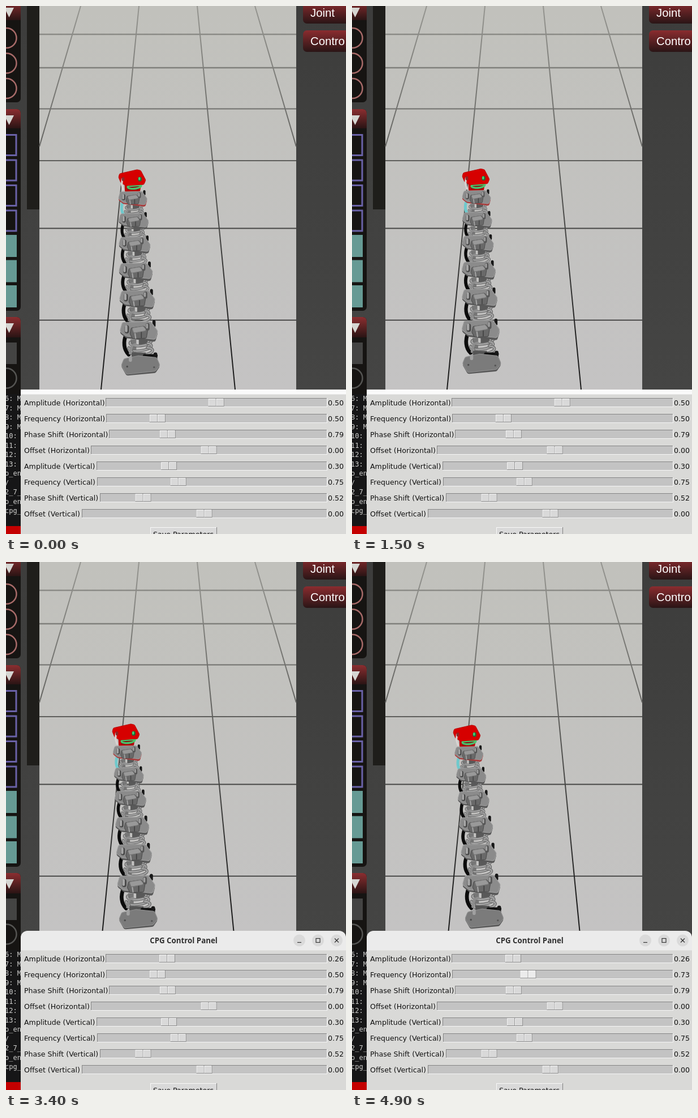
These frames come from a looping animation (601x932 px, 5 s). An HTML page with a canvas:

```html
<!DOCTYPE html>
<html lang="en">
<head>
<meta charset="utf-8">
<title>CPG control</title>
<style>
html, body { margin: 0; width: 100%; height: 100%; overflow: hidden; background: #424241; }
canvas { display: block; }
</style>
</head>
<body>
<canvas id="stage" width="601" height="932"></canvas>
<script>
const c = document.getElementById('stage').getContext('2d');
const LOOP = 5000, STEP = 100;
const SANS = '12.6px "DejaVu Sans", sans-serif';
const lerp = (a, b, u) => a + (b - a) * u;
const ramp = (t, t0, t1, a, b) => lerp(a, b, Math.min(1, Math.max(0, (t - t0) / (t1 - t0))));

function rect(x, y, w, h, fill) {
  c.fillStyle = fill;
  c.fillRect(x, y, w, h);
}
function round(x, y, w, h, r, fill) {
  c.fillStyle = fill;
  c.beginPath();
  c.roundRect(x, y, w, h, r);
  c.fill();
}
function line(pts, color, width) {
  c.strokeStyle = color;
  c.lineWidth = width;
  c.beginPath();
  pts.forEach(p => c.lineTo(p[0], p[1]));
  c.stroke();
}
function ring(x, y, r, color, width) {
  c.strokeStyle = color;
  c.lineWidth = width;
  c.beginPath();
  c.arc(x, y, r, 0, 7);
  c.stroke();
}
function text(s, x, y, font, color, align = 'left') {
  c.font = font;
  c.fillStyle = color;
  c.textAlign = align;
  c.fillText(s, x, y);
}
function fade(y0, y1, a, b) {
  const g = c.createLinearGradient(0, y0, 0, y1);
  g.addColorStop(0, a);
  g.addColorStop(1, b);
  return g;
}
// Polygon with softened corners
function slab(pts, fill, edge, r = 4) {
  const n = pts.length, last = pts[n - 1];
  c.beginPath();
  c.moveTo((last[0] + pts[0][0]) / 2, (last[1] + pts[0][1]) / 2);
  pts.forEach((p, i) => {
    const q = pts[(i + 1) % n];
    c.arcTo(p[0], p[1], (p[0] + q[0]) / 2, (p[1] + q[1]) / 2, r);
  });
  c.closePath();
  c.fillStyle = fill;
  c.fill();
  if (edge) {
    c.strokeStyle = edge;
    c.lineWidth = 1;
    c.stroke();
  }
}

function header(x, y, h, w) {
  round(x, y, w, h, [7, 7, 0, 0], fade(y, y + h, '#8b2e30', '#2a1414'));
}
function arrow(y) {
  c.fillStyle = '#d6d6d2';
  c.beginPath();
  c.moveTo(-3, y);
  c.lineTo(14, y);
  c.lineTo(5.5, y + 17);
  c.fill();
}

function sidePanels() {
  rect(0, 0, 601, 932, fade(0, 677, '#3d3d3c', '#454544'));
  rect(37, 0, 22, 359, '#1f1e1b');

  round(-20, -20, 46, 190, 7, '#161412');
  header(-20, -10, 35, 46);
  arrow(3);
  for (const y of [56.5, 101, 145.5]) ring(1, y, 17.5, '#a86b69', 2.5);

  round(-20, 182, 46, 356, 7, '#161412');
  header(-20, 182, 34, 46);
  arrow(193);
  for (let i = 0; i < 7; i++) {
    const y = 226 + i * 44.5;
    if (i < 4) {
      c.strokeStyle = '#6a62a8';
      c.lineWidth = 3;
      c.strokeRect(-20, y + 1.5, 38, 36);
    } else rect(-20, y, 39, 39, '#669a94');
  }

  round(-20, 549, 46, 200, 7, '#161412');
  header(-20, 549, 36, 46);
  arrow(560);
  rect(-20, 594, 39, 38, '#444443');
  ring(1, 657, 17.5, '#555553', 2.5);

  for (const y of [-8, 43]) {
    const h = y < 0 ? 39 : 38;
    round(525, y, 90, h, 7, fade(y, y + h, '#8a2c2f', '#2a1516'));
  }
  const big = '20.3px "Liberation Sans", Arial, sans-serif';
  text('Joint', 538, 18.5, big, '#fff');
  text('Contro', 538, 69, big, '#fff');
}

function terminal() {
  rect(0, 685, 26, 247, '#161617');
  const rows = ['6: M', '7: M', '8: M', '9: M', '10:', '11:', '12:', '13:', 'o_en', '/', '2_7_', 'o_en', 'cpg_'];
  rows.forEach((s, i) =>
    text(s, -2, 697 + i * 16.5, '12px "DejaVu Sans Mono", monospace', '#d0d0ce'));
  rect(0, 918, 26, 14, '#c40000');
}

function floor() {
  rect(59, 0, 454, 677, fade(0, 677, '#c1c1bc', '#c4c3c3'));
  const ink = fade(0, 600, '#959590', '#1c1c1c');
  [50, 109, 181.5, 273, 392.5, 554.5].forEach(y =>
    line([[59, y], [513, y]], ink, 2.5 - y / 600));
  [[132, 59, 248], [235, 168, 677], [338, 405, 677], [440, 513, 248]].forEach(([a, b, y]) =>
    line([[a, 0], [b, y]], ink, 2));
}

// time, head x, bend, tail x, head y, tail y, sway, lift, half waves to the next pose
const POSES = [
  [0, 223, -2.2, 238, 304, 632, 6, 3, 3],
  [900, 218, 0, 232.5, 302, 631, 6, 3, 2],
  [1500, 219, -1, 229.5, 302.5, 629, 6, 6, 3],
  [2300, 216, -.7, 231.5, 303, 631, 4, 9, 4],
  [3400, 212, -1.5, 234, 301, 628, 3, 8, 4],
  [4400, 205, -3.5, 238, 303, 627, 2, 6, 2],
  [4900, 203, -1.5, 234, 303, 627, 0, 0, 1]
];
const ROWS = [303, 338, 377, 419, 466, 515, 571, 630];
const HALF = [24, 25.5, 26.5, 28, 30, 31.5, 33.5, 34];

function joints(t) {
  let i = POSES.length - 1;
  while (POSES[i][0] > t) i--;
  const a = POSES[i], b = POSES[i + 1] || a;
  const s = b === a ? 0 : (t - a[0]) / (b[0] - a[0]);
  const [, hx, bend, tx, hy, ty] = a.map((v, k) => lerp(v, b[k], s));
  const wave = Math.sin(Math.PI * a[8] * s);
  return ROWS.map((y, k) => {
    const u = k / 7;
    return {
      x: lerp(hx - a[6] * wave, tx + 1.5 * wave, u) + bend * 4 * u * (1 - u),
      y: y + lerp(hy - 303 - a[7] * Math.abs(wave), ty - 630 - Math.abs(wave), u),
      s: HALF[k] / 30
    };
  });
}

function peg(x, y, w, h, fill) {
  round(x - w / 2, y - h / 2, w, h, w / 2, fill);
}
function coil(x, y, rx, ry, from, to) {
  const arc = (color, width) => {
    c.strokeStyle = color;
    c.lineWidth = width;
    c.beginPath();
    c.ellipse(x, y, rx, ry, -.12, from, to);
    c.stroke();
  };
  arc('#646464', 4.6);
  arc('#a2a2a2', 2.6);
}
function cable(color) {
  c.strokeStyle = color;
  c.lineWidth = 6;
  c.beginPath();
  c.moveTo(-20, 6);
  c.bezierCurveTo(-25, 18, -24, 30, -16, 38);
  c.stroke();
}

function link(k) {
  cable(k === 1 ? '#6fc9cc' : '#0c0c0c');
  rect(-13, 14, 9, 24, '#777');
  rect(0, 12, 14, 12, '#595959');
  coil(3, 18, 17, 6, -.3, 3.4);
  coil(2, 26, 18, 6, -.8, 3.3);
  coil(5, 33, 17, 6, -1, 3.5);
  line([[-14, 36], [-11, 24], [-5, 22]], '#8d8d8d', 4);
  peg(24, -11, 5, 11, '#171717');
  slab([[-26, -10], [19, -11], [30, 4], [26, 18], [-20, 12], [-30, 4]], k === 1 ? '#a83c3c' : '#585858');
  slab([[-26, -13], [19, -14], [30, 1], [26, 14], [-20, 9], [-30, 1]], '#8b8b8b', '#a0a0a0');
  slab([[-12, -4], [8, -7], [14, 0], [12, 12], [-10, 13], [-14, 5]], '#696969', '#4c4c4c', 2);
  slab([[-11, -4], [7, -7], [13, 0], [-8, 4]], '#999', '#777', 2);
  line([[-6, 5], [-5, 12]], '#a5a5a5', 2);
  line([[4, 3], [4, 11]], '#404040', 1.5);
  peg(-19, -2, 7, 13, '#484848');
  peg(-20, -3, 4, 11, '#a6a6a6');
  peg(14, -6, 6, 12, '#565656');
  peg(13, -7, 3, 8, '#a0a0a0');
}

function head() {
  slab([[-17, 8], [21, 9], [17, 31], [-16, 31]], '#b90707');
  rect(-10, 16, 24, 10, '#801414');
  c.strokeStyle = '#48c46d';
  c.lineWidth = 4;
  c.beginPath();
  c.ellipse(5, 18, 15, 5, -.1, -.2, 3.5);
  c.stroke();
  slab([[-30, -2], [-28, -10], [11, -19], [19, -17], [30, 4], [26, 14], [-13, 17], [-25, 10]], '#d60000', '#b40000');
  line([[-22, 2], [-23, 14], [-20, 25]], '#d8d4d2', 4);
  peg(-20, 2, 6, 9, '#8e2626');
  peg(17, 2, 8, 10, '#1d6d38');
  peg(16, 1, 4, 7, '#49d476');
  line([[-10, 18], [20, 16]], '#45d071', 2.5);
}

function tail() {
  rect(-14, -18, 22, 13, '#555');
  line([[6, -13], [24, -13]], '#111', 5);
  peg(23, -12, 6, 12, '#171717');
  slab([[-30, 4], [-26, -5], [8, -11], [25, -8], [30, 4], [23, 14], [-22, 18]], '#565656');
  slab([[-30, 2], [-26, -8], [-4, -13], [25, -10], [30, 2], [23, 11], [-22, 16]], '#7b7b7b', '#8d8d8d');
  peg(-21, 4, 3, 3, '#4d4d4d');
  peg(21, 5, 3, 3, '#555');
  peg(-16, -8, 5, 9, '#a0a0a0');
}

function robot(t) {
  c.lineCap = c.lineJoin = 'round';
  joints(t).forEach((j, k) => {
    c.save();
    c.translate(j.x, j.y);
    c.scale(j.s, j.s);
    if (k === 0) head();
    else if (k === 7) tail();
    else link(k);
    c.restore();
  });
  c.lineCap = 'butt';
  c.lineJoin = 'miter';
}

function bevel(x, y, w, h, fill, tl, br) {
  rect(x, y, w, h, br);
  rect(x, y, w - 1, h - 1, tl);
  rect(x + 1, y + 1, w - 2, h - 2, fill);
}
function slider(row, label, left, value, part, lit) {
  const y = 692 + row * 28, x = left + 1 + part * (567 - left - 30);
  text(label, 32, y + 12.5, SANS, '#111');
  bevel(left, y, 568 - left, 16, '#c3c3c3', '#858585', '#f5f5f5');
  for (const dx of [0, 14]) bevel(x + dx, y + 1, 14, 14, lit ? '#ececec' : '#d9d9d9', '#f8f8f8', '#858585');
  text(value.toFixed(2), 569, y + 12.5, SANS, '#111');
}

function titleBar() {
  round(26, 651, 575, 40, [12, 12, 0, 0], '#ebebeb');
  text('CPG Control Panel', 314, 672.5, 'bold 13.3px "Noto Sans", sans-serif', '#303030', 'center');
  for (const x of [518.5, 551.5, 584.5]) {
    c.fillStyle = '#dadada';
    c.beginPath();
    c.arc(x, 668, 10.5, 0, 7);
    c.fill();
  }
  const ink = '#333';
  line([[515, 671.5], [522, 671.5]], ink, 1.2);
  c.strokeRect(548, 664.5, 7, 7);
  line([[581, 664.5], [588, 671.5]], ink, 1.2);
  line([[588, 664.5], [581, 671.5]], ink, 1.2);
}

function controls(t) {
  if (t >= 2400) titleBar();
  else rect(26, 677, 575, 9, '#fafafa');
  rect(26, 685.5, 575, 247, '#d9d9d7');

  // Labels trail the dragged handle slightly
  const amp = q => ramp(q, 2460, 3000, .5, .26);
  const freq = q => ramp(q, 4340, 4800, .5, .73);
  const share = f => (f - .1) / 1.9;
  const lead = t + 40;
  slider(0, 'Amplitude (Horizontal)', 176, amp(t), amp(lead), t >= 2300 && t < 3200);
  slider(1, 'Frequency (Horizontal)', 177, freq(t), share(freq(lead)), t >= 4100);
  slider(2, 'Phase Shift (Horizontal)', 182, .79, .25, false);
  slider(3, 'Offset (Horizontal)', 150, 0, .5, t >= 1700 && t < 1800);
  slider(4, 'Amplitude (Vertical)', 160, .3, .3, false);
  slider(5, 'Frequency (Vertical)', 161, .75, share(.75), false);
  slider(6, 'Phase Shift (Vertical)', 166, .52, .52 / Math.PI, false);
  slider(7, 'Offset (Vertical)', 134, 0, .5, false);
  bevel(255, 920, 118, 26, '#d9d9d9', '#f8f8f8', '#808080');
  text('Save Parameters', 313.5, 937, SANS, '#111', 'center');
}

function draw(now) {
  const t = Math.floor((now % LOOP) / STEP) * STEP;
  sidePanels();
  floor();
  robot(t);
  terminal();
  controls(t);
}
let start;
function tick(now) {
  start ??= now;
  draw(Math.max(0, now - start));
  requestAnimationFrame(tick);
}
draw(0);
requestAnimationFrame(tick);
</script>
</body>
</html>
```
